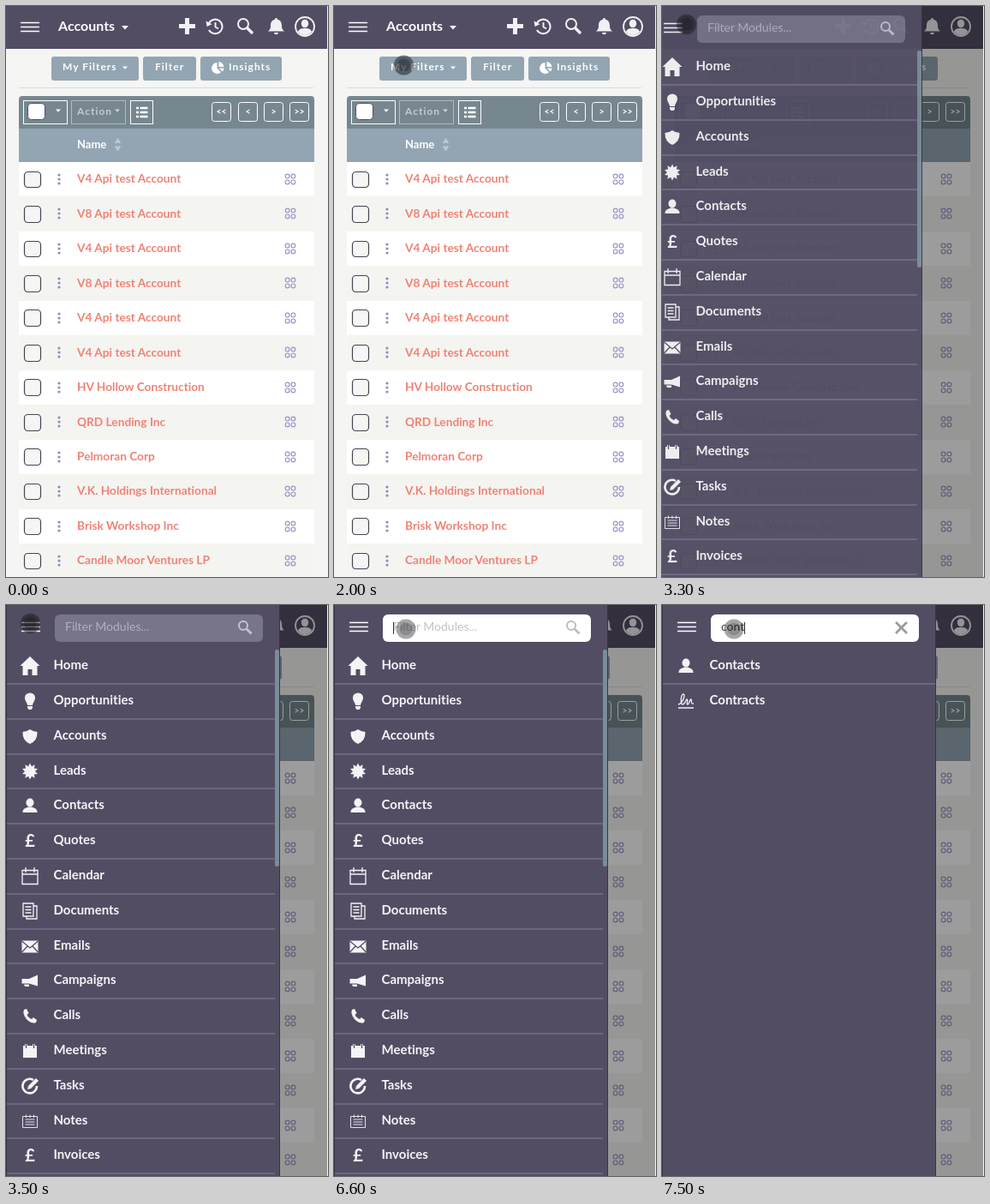
Recreate the animation shown at these times as an HTML page. Size 376 px wide and 666 px high, loop 8 s.

```html
<!DOCTYPE html>
<html lang="en">
<head>
<meta charset="utf-8">
<title>Module menu</title>
<style>
html, body { margin: 0; width: 100%; height: 100%; overflow: hidden; background: #f5f5f3; }
svg { display: block; width: 376px; height: 666px; font-family: Lato, "Open Sans", sans-serif; font-variant-ligatures: none; }
.b { font-weight: 700; }
.btn { font-size: 12px; font-weight: 700; letter-spacing: 1px; fill: #fff; }
.line { fill: none; stroke: #fff; }
.name { font-size: 13.7px; font-weight: 700; fill: #ef8375; }
.mod { font-size: 15px; font-weight: 700; fill: #f4f4f6; }
.field { font-size: 14px; }
.ico { fill: #f4f4f6; stroke: none; }
.ico .o { fill: none; stroke: #f4f4f6; stroke-width: 1.3; }
.ico .thin { stroke-width: .9; }
.ico .bold { stroke-width: 2.6; }
.ico .d { fill: none; stroke: #534d64; stroke-width: 1.3; }

.cursor, .title, .burger, .shade, .menu, .box, .hint, .lens, .caret, .q0, .q1, .q2, .q3, .clear {
  animation: 8s step-end -20ms infinite;
}
.cursor { animation-name: cursor; }
.title { animation-name: title; }
.burger { animation-name: burger; }
.shade { animation-name: shade; }
.menu { animation-name: menu; }
.box { animation-name: box; }
.hint { animation-name: hint; }
.lens { animation-name: lens; }
.caret { animation-name: caret; }
.q0 { animation-name: q0; }
.q1 { animation-name: q1; }
.q2 { animation-name: q2; }
.q3 { animation-name: q3; }
.clear { animation-name: clear; }

@keyframes cursor {
  0% { opacity: 0; transform: translate(354.5px, 375.5px); }
  6.25% { opacity: 1; transform: translate(354.5px, 375.5px); }
  16.25% { transform: translate(346px, 365px); }
  17.5% { transform: translate(317px, 327px); }
  18.75% { transform: translate(266px, 248px); }
  20% { transform: translate(205px, 155px); }
  21.25% { transform: translate(156px, 86px); }
  22.5% { transform: translate(132.5px, 59.5px); }
  25% { transform: translate(81.5px, 69px); }
  26.25% { transform: translate(50px, 47px); }
  27.5% { transform: translate(30px, 30px); }
  28.75% { transform: translate(21.5px, 24.5px); }
  30% { transform: translate(28.5px, 21.5px); }
  57.5% { transform: translate(58px, 26px); }
  58.75% { opacity: 1; transform: translate(84px, 28px); }
  67.5% { opacity: .85; }
  68.75% { opacity: .75; }
  70%, 100% { opacity: .75; transform: translate(84px, 28px); }
}
@keyframes title { 0% { transform: none; } 40%, 100% { transform: translateX(-2px); } }
@keyframes burger { 0% { stroke: #fff; } 27.5%, 100% { stroke: #ffa792; } }
@keyframes shade { 0% { opacity: 0; } 41.25% { opacity: .39; } 100% { opacity: .39; } }
@keyframes menu {
  0% { opacity: 0; transform: translateX(-320px); }
  41.25% { opacity: .94; transform: translateX(-16px); }
  42.5% { opacity: .99; transform: translateX(-4px); }
  43.75%, 100% { opacity: 1; transform: none; }
}
@keyframes box { 0% { fill: #78748a; } 67.5% { fill: #817d8b; } 68.75% { fill: #c6c4cb; } 70%, 100% { fill: #fff; } }
@keyframes hint { 0% { fill: #b3b0be; } 67.5% { fill: #cbc9d2; } 70% { fill: #c3c3c3; } 88.75%, 100% { fill: transparent; } }
@keyframes lens { 0% { stroke: #c4c2cd; } 67.5% { stroke: #e0dfe5; } 68.75% { stroke: #d0d0d4; } 70% { stroke: #bdbdbd; } 88.75%, 100% { stroke: transparent; } }
@keyframes caret { 0% { opacity: 0; } 70% { opacity: 1; } 75% { opacity: 0; } 82.5% { opacity: 1; } 88.75%, 100% { opacity: 0; } }
@keyframes q0 { 0% { visibility: visible; } 88.75%, 100% { visibility: hidden; } }
@keyframes q1 { 0% { visibility: hidden; } 88.75% { visibility: visible; } 90%, 100% { visibility: hidden; } }
@keyframes q2 { 0% { visibility: hidden; } 90% { visibility: visible; } 93.75%, 100% { visibility: hidden; } }
@keyframes q3 { 0% { visibility: hidden; } 93.75%, 100% { visibility: visible; } }
@keyframes clear { 0% { visibility: hidden; } 88.75%, 100% { visibility: visible; } }
</style>
</head>
<body>
<svg viewBox="0 0 376 666">
  <defs>
    <g id="loops" fill="none" stroke="#9c97c9" stroke-width="1.2">
      <circle cx="-3.4" cy="-3.4" r="2.4"/><circle cx="3.4" cy="-3.4" r="2.4"/>
      <circle cx="-3.4" cy="3.4" r="2.4"/><circle cx="3.4" cy="3.4" r="2.4"/>
    </g>
    <path id="down" d="M-3 -1.5H3L0 1.8Z" fill="#fff"/>
    <path id="bars" d="M-11 -5H11M-11 0H11M-11 5H11" stroke-width="1.6"/>
    <g id="glass" fill="none"><circle cx="-2" cy="-2" r="5"/><path d="M2 2L7.5 7.5" stroke-width="2.8"/></g>
  </defs>

  <rect width="376" height="666" fill="#f5f5f3"/>
  <rect width="375" height="50" fill="#534d64"/>
  <use href="#bars" x="28" y="24.5" class="burger" stroke="#fff"/>
  <g class="title">
    <text x="61" y="29" class="b" font-size="16" fill="#fff">Accounts</text>
    <use href="#down" transform="translate(139 25) scale(1.35)"/>
  </g>
  <g fill="#f1f0f4">
    <path d="M209 14h5v7h7v5h-7v7h-5v-7h-7v-5h7z"/>
    <g fill="none" stroke="#f1f0f4" stroke-width="2">
      <path d="M236.7 20.5A8.3 8.3 0 1 1 237 28M244.5 19V24.5L248 26.5"/>
      <circle cx="277" cy="21" r="6"/><path d="M281.5 25.5L288 32" stroke-width="3.4"/>
      <circle cx="349" cy="24" r="11" stroke-width="1.8"/>
    </g>
    <path d="M233.5 17.5l1 6.5 6-2.8z"/>
    <path d="M315.5 14a1.5 1.5 0 0 1 1.5 1.8c4 1 5 4 5 7.2 0 4 1.5 5 3 6.5H306c1.5-1.5 3-2.5 3-6.5 0-3.2 1-6.2 5-7.2a1.5 1.5 0 0 1 1.5-1.8zM313 31h5a2.5 2.3 0 0 1-5 0z"/>
    <ellipse cx="349" cy="20.5" rx="4.2" ry="4.8"/><path d="M341 30c1-3.5 4-4 8-4s7 .5 8 4a10 10 0 0 1-16 0z"/>
  </g>

  <g fill="#93a5b2">
    <rect x="53" y="59" width="102" height="28" rx="3"/>
    <rect x="160" y="59" width="62" height="28" rx="3"/>
    <rect x="227" y="59" width="95" height="28" rx="3"/>
  </g>
  <g class="btn">
    <text x="66" y="75">My Filters</text><text x="174" y="75">Filter</text><text x="260" y="75">Insights</text>
    <use href="#down" transform="translate(139 72)"/>
    <path d="M246.5 66V72.5L251 77.3A6.5 6.5 0 1 1 246.5 66zM248.5 65a6.5 6.5 0 0 1 6 6h-6zM249 72.5h5.5a6 6 0 0 1-2 4z"/>
  </g>
  <path d="M15 95.5H359" stroke="#dadada"/>

  <path d="M15 143V109a4 4 0 0 1 4-4H356a4 4 0 0 1 4 4V143z" fill="#76878f"/>
  <rect x="15" y="143" width="345" height="39" fill="#93a5b2"/>
  <g class="line">
    <rect x="20.5" y="110.5" width="51" height="27"/>
    <rect x="76.5" y="110.5" width="63" height="27" stroke="#aebac0"/>
    <rect x="145.5" y="110.5" width="26" height="27"/>
    <path d="M152 119h3M152 124h3M152 129h3M156.5 119h9M156.5 124h9M156.5 129h9" stroke-width="2.6"/>
  </g>
  <rect x="25.5" y="113.5" width="20" height="19" rx="4" fill="#fff" stroke="#534d64"/>
  <use href="#down" x="61" y="122"/>
  <text x="83" y="127" class="btn" style="fill:#c3ccd0">Action</text>
  <use href="#down" x="130" y="122" opacity=".65"/>
  <g id="pages"></g>
  <text x="83" y="166" class="b" font-size="13" fill="#fff">Name</text>
  <path d="M126.5 160l4-6 4 6zM126.5 163.5l4 6 4-6z" fill="#bdc8d0"/>
  <g id="rows"></g>
  <rect x="375" width="1" height="666" fill="#f4f4f4"/>

  <rect class="shade" width="375" height="666" opacity="0"/>

  <g class="menu">
    <rect width="320" height="666" fill="#383444"/>
    <rect x="1" width="318" height="666" fill="#534d64"/>
    <use href="#bars" x="29" y="25.5" stroke="#fff"/>
    <rect class="box" x="57" y="11" width="243" height="32" rx="6"/>
    <text class="field hint" x="69" y="30">Filter Modules...</text>
    <use class="lens" href="#glass" x="279" y="26" stroke-width="2"/>
    <path class="clear" d="M273 20L286 33M286 20L273 33" stroke="#999" stroke-width="2.6"/>
    <rect class="caret" x="69" y="20" width="1" height="14" fill="#333"/>
    <g id="lists"></g>
    <rect class="q0" x="314" y="52" width="5" height="253" rx="2" fill="#788d99"/>
  </g>

  <g class="cursor">
    <circle r="11.5" fill="#14141a" fill-opacity=".5"/>
    <circle r="7.5" fill="#14141a" fill-opacity=".3"/>
  </g>
</svg>
<script>
const put = (id, html) => document.getElementById(id).innerHTML = html;
const snap = Math.round;

put('pages', ['&lt;&lt;', '&lt;', '&gt;', '&gt;&gt;'].map((label, i) => {
  const x = 240.5 + Math.ceil(i * 30.3);
  return `<rect class="line" x="${x}" y="112.5" width="22" height="22" rx="3"/>
    <text x="${x + 11}" y="127" class="b" font-size="10.5" fill="#fff" text-anchor="middle">${label}</text>`;
}).join(''));

const api = [4, 8, 4, 8, 4, 4].map(n => `V${n} Api test Account`);
const accounts = [...api, 'HV Hollow Construction', 'QRD Lending Inc', 'Pelmoran Corp',
  'V.K. Holdings International', 'Brisk Workshop Inc', 'Candle Moor Ventures LP'];

put('rows', accounts.map((name, i) => {
  const y = 182 + i * 40.45, mid = snap(y + 20);
  const top = snap(y + 10.6), bottom = snap(y + 30.4);
  const dots = [-5, 0, 5].map(d => `<circle cx="62" cy="${mid + d}" r="1.6" fill="#8f8bbd"/>`).join('');
  return `<rect x="15" y="${snap(y)}" width="345" height="41" fill="${i % 2 ? '#f4f4f1' : '#fff'}"/>
    <rect x="21.5" y="${top + .5}" width="19" height="${bottom - top - 1}" rx="4" fill="#f6f6f5" stroke="#474354" stroke-width="1.2"/>
    ${dots}<text class="name" x="83" y="${snap(y + 24.35)}">${name}</text>
    <use href="#loops" x="332" y="${mid}"/>`;
}).join(''));

const burst = Array.from({ length: 20 }, (_, i) => {
  const r = i % 2 ? 6 : 9.5, a = i * Math.PI / 10;
  return (r * Math.sin(a)).toFixed(1) + ',' + (-r * Math.cos(a)).toFixed(1);
}).join(' ');
const fill = d => `<path d="${d}"/>`;
const out = (d, weight = '') => `<path class="o ${weight}" d="${d}"/>`;
const dark = d => `<path class="d" d="${d}"/>`;
const pound = '<text class="b" font-size="20" text-anchor="middle" y="7">£</text>';
const sheet = out('M-8 -9H4V6H-8ZM-5.5 -5H1.5M-5.5 -1.5H1.5M-5.5 2H1.5M4 -6H8V9H-4V6');

const modules = {
  Home: fill('M0 -11L11.5 0H8.5V11H2.5V4H-2.5V11H-8.5V0H-11.5Z'),
  Opportunities: fill('M-3 5C-3 2 -6 0 -6 -4A6 5.5 0 0 1 6 -4C6 0 3 2 3 5ZM-3 6H3V8L1.5 10H-1.5L-3 8Z'),
  Accounts: fill('M0 -8Q4 -5 8.5 -5Q9 5 0 9Q-9 5 -8.5 -5Q-4 -5 0 -8Z'),
  Leads: `<polygon points="${burst}"/>`,
  Contacts: '<ellipse cy="-3.5" rx="4.5" ry="5"/>' + fill('M-8.5 8C-8.5 3 -5 3 -2 1.5H2C5 3 8.5 3 8.5 8Z'),
  Quotes: pound,
  Calendar: out('M-9 -6.5H9V9.5H-9ZM-9 -2H9M-5 -10V-4M5 -10V-4'),
  Documents: sheet,
  Emails: fill('M-9.5 -6.5H9.5V7.5H-9.5Z') + dark('M-9.5 -6L0 2L9.5 -6M-9.5 7L-3 0M9.5 7L3 0'),
  Campaigns: fill('M9 -6.5V6.5L-1 3.5H-9.5V-2H-1ZM-7 4.5H-1V7H-6Z'),
  Calls: fill('M-7 -7L-4 -8L-1.5 -3L-3.5 -1Q-1.5 3 2 4L4 2L8 5L7 8Q2 10 -4 4Q-9 -2 -7 -7Z'),
  Meetings: fill('M-8 -6H-6V-8H-3V-6H3V-8H6V-6H8V8H-8Z') + dark('M-4.5 -8V-3M4.5 -8V-3'),
  Tasks: out('M4 -7A8.3 8.3 0 1 0 8 0', 'bold') + fill('M-3 4L-2 0L7 -9L10 -6L1 3Z'),
  Notes: out('M-8.5 -5.500H8.500V7.500H-8.500ZM-5.500 -2H5.500M-5.500 1H5.500M-5.500 4H5.500M-4.500 -7.500V-4M0 -7.500V-4M4.500 -7.500V-4', 'thin'),
  Invoices: pound,
  Contracts: out('M-9 4C-4 3 0 -8 -3 -8C-6 -8 -7 4 -4 4C-1 4 0 -2 1 -2C3 -2 0 4 2 4C4 4 4 -2 6 -2C7 -2 5 4 9 3M-9 8H9'),
  Discounts: sheet
};

// One list per typed query; carets sit after the typed letters.
put('lists', [['', 0], ['c', 76], ['co', 84], ['cont', 96]].map(([query, caret], n) => {
  const hits = Object.keys(modules).filter(m => m.toLowerCase().includes(query));
  const items = hits.map((m, i) => {
    const mid = 70.2 + i * 40.8, y = snap(mid);
    const rule = i < hits.length - 1
      ? `<rect x="1" y="${snap(mid + 20.8)}" width="${n ? 318 : 313}" height="2" fill="#6b677f"/>` : '';
    return `<g class="ico" transform="translate(28 ${y + 1})">${modules[m]}</g>
      <text class="mod" x="55.5" y="${y + 5}">${m}</text>${rule}`;
  }).join('');
  const typed = query && `<text class="field" x="69" y="30" fill="#444">${query}</text>
    <rect x="${caret}" y="20" width="1" height="14" fill="#333"/>`;
  return `<g class="q${n}">${items}${typed}</g>`;
}).join(''));
</script>
</body>
</html>
```
